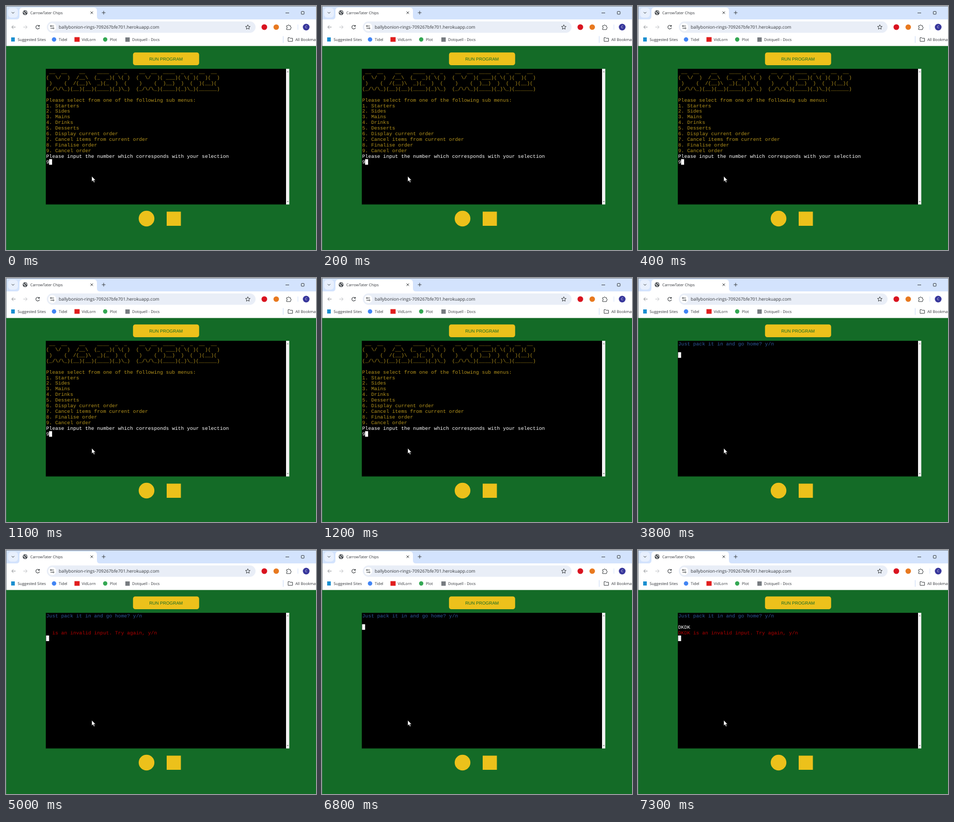
An HTML page for the animation above (8 s loop, 600 px wide and 474 px high).

```html
<!DOCTYPE html>
<html lang="en">
<head>
<meta charset="utf-8">
<title>Restaurant terminal</title>
<style>
  html, body { margin: 0; width: 100%; height: 100%; overflow: hidden; background: #146b27; }
  svg { display: block; width: 600px; height: 474px; }
  text { white-space: pre; text-rendering: geometricPrecision; }
  .ui { font-family: "Open Sans", sans-serif; font-size: 7.5px; fill: #33363b; }
  .term { font-family: "Liberation Mono", monospace; font-size: 9.67px; }
  .line { fill: none; stroke: #3c4043; stroke-width: 1; }
</style>
</head>
<body>
<svg viewBox="0 0 600 474">
  <!-- tab strip -->
  <rect width="600" height="40" fill="#d3e3fd"/>
  <rect x="4" y="3.5" width="19" height="19" rx="6" fill="#e8f0fe"/>
  <path class="line" d="M11 11.8l2.5 2.5 2.5-2.5" stroke-width="1.2"/>
  <path d="M20 26q6 0 6-6V9q0-6 6-6h138q6 0 6 6v11q0 6 6 6z" fill="#fff"/>
  <circle cx="37" cy="13" r="4.7" fill="#4a4e53"/>
  <path d="M33.4 11.6q2.2.2 2.6 1.7.2 1.2 1.2 1.4-.2 1.6-.6 2.2M38 9.2q-.8 1.6.6 2 1.7 0 2.2 1.6" fill="none" stroke="#fff" stroke-width="1.1"/>
  <text class="ui" x="47" y="15.8" style="font-size:7.35px">CarrowTater Chips</text>
  <path class="line" d="M163.6 10.6l4.8 4.8m0-4.8l-4.8 4.8M185.5 13h7m-3.5-3.5v7M541 13.5h7"/>
  <rect class="line" x="571.5" y="10.5" width="5.5" height="5.5" rx=".8"/>

  <!-- toolbar -->
  <rect y="26" width="600" height="52" fill="#fff"/>
  <g class="line">
    <path d="M18.5 41h-7.5m3.4-3.4l-3.4 3.4 3.4 3.4" stroke="#8b8e92"/>
    <path d="M33.5 41h7.5m-3.4-3.4l3.4 3.4-3.4 3.4" stroke="#bfc1c4"/>
    <path d="M64 38.8a3.5 3.5 0 1 0 .7 3.2M64.6 37v2.5h-2.5" stroke-width="1.1"/>
  </g>
  <rect x="79" y="30" width="404" height="22" rx="11" fill="#e9eef7"/>
  <circle cx="89.5" cy="41" r="7.8" fill="#fff"/>
  <g class="line" stroke-width=".9">
    <path d="M88.8 38.9h4M86 43.2h4"/>
    <circle cx="87" cy="38.9" r="1.2"/>
    <circle cx="91.7" cy="43.2" r="1.2"/>
  </g>
  <text class="ui" x="102" y="44.2" style="font-size:8.58px">ballybonion-rings-709267bfe701.herokuapp.com</text>
  <path class="line" d="M468 36.5l1.3 3 3.2.3-2.4 2.1.7 3.2-2.8-1.7-2.8 1.7.7-3.2-2.4-2.1 3.2-.3z" stroke-width=".9"/>
  <circle cx="500" cy="41" r="5.5" fill="#d9131f"/>
  <circle cx="523" cy="41" r="5.3" fill="#e8791f"/>
  <path class="line" d="M543 38.2h2.5a1.4 1.4 0 0 1 2.8 0h2.4v2.6a1.4 1.4 0 0 1 0 2.8v2.2h-7.7v-2.4a1.4 1.4 0 0 0 0-2.8z" stroke-width="1.1"/>
  <path d="M565 36v10" stroke="#d3e3fd"/>
  <circle cx="581" cy="41" r="6.5" fill="#37369b"/>
  <text class="ui" x="581" y="43.3" text-anchor="middle" style="font-size:6.5px;fill:#fff">C</text>

  <!-- bookmarks -->
  <rect x="10" y="61" width="7" height="8" fill="#1b8fd0"/>
  <circle cx="93" cy="65" r="4.3" fill="#4285f4"/>
  <rect x="132.5" y="60.5" width="10" height="9" fill="#e11d1d"/>
  <circle cx="192" cy="65" r="4.2" fill="#34a853"/>
  <rect x="231" y="61" width="8.5" height="8.5" fill="#777b80"/>
  <g class="ui">
    <text x="22.5" y="67.5">Suggested Sites</text>
    <text x="102" y="67.5">Tidel</text>
    <text x="146.5" y="67.5">VidLorn</text>
    <text x="201" y="67.5">Plot</text>
    <text x="244" y="67.5">Dotquell - Docs</text>
    <text x="560" y="67.5">All Bookmarks</text>
  </g>
  <path d="M536.5 58.5v13" stroke="#c9d9f5"/>
  <path class="line" d="M546 61.5h3l1 1.2h4.6v6h-8.6z"/>

  <!-- window edge -->
  <path d="M0 .5H600M.5 0V78" stroke="#7d848c" stroke-width="1"/>

  <!-- page -->
  <rect y="77.7" width="600" height="396.3" fill="#146b27"/>
  <rect y="78" width=".8" height="396" fill="#6c757d" opacity=".6"/>
  <rect x="245.8" y="90.2" width="128" height="24.9" rx="4.5" fill="#ecc11b"/>
  <text x="309.7" y="105.6" text-anchor="middle" font-family="Liberation Sans, Arial, sans-serif" font-size="8.55" fill="#146b27">RUN PROGRAM</text>
  <rect x="77" y="122" width="465" height="263.5" fill="#000"/>
  <rect x="542" y="122" width="6.3" height="263.5" fill="#f3f3f3"/>
  <path d="M543.3 128.6l2-2.2 2 2.2zM543.3 379l2 2.2 2-2.2z" fill="#8b8b8b"/>
  <circle cx="272" cy="413" r="15.2" fill="#ecc11b"/>
  <rect x="311" y="399.5" width="27.5" height="27.5" fill="#ecc11b"/>

  <g id="screen" class="term"></g>
  <rect id="caret" width="5.8" height="10.9" fill="#fff"/>
  <path d="M166 330.8v10.4l2.4-2.2 1.7 3.9 1.7-.8-1.7-3.7h3.2z" fill="#fff" stroke="#000" stroke-width=".5"/>
</svg>
<script>
const LOOP = 8000, LEFT = 77.8, TOP = 122.3, PITCH = 10.95, CHAR = 5.8;
const GOLD = '#b3921c', BLUE = '#2d5899', RED = '#ad0000', WHITE = '#fff';
const screenEl = document.getElementById('screen');
const caret = document.getElementById('caret');

const banner = String.raw`
 __  __    __    ____  _  _    __  __  ____  _  _  __  __
(  \/  )  /__\  (_  _)( \( )  (  \/  )( ___)( \( )(  )(  )
 )    (  /(__)\  _)(_  )  (    )    (  )__)  )  (  )(__)(
(_/\/\_)(__)(__)(____)(_)\_)  (_/\/\_)(____)(_)\_)(______)`.split('\n').slice(1);

const options = ['Starters', 'Sides', 'Mains', 'Drinks', 'Desserts', 'Display current order',
  'Cancel items from current order', 'Finalise order', 'Cancel order'];

// A line is [row, colour, text]; a view holds lines and the caret cell.
function menu() {
  const gold = [...banner, '', 'Please select from one of the following sub menus:',
    ...options.map((name, i) => `${i + 1}. ${name}`)];
  return {
    lines: [...gold.map((text, row) => [row, GOLD, text]),
      [15, WHITE, 'Please input the number which corresponds with your selection'],
      [16, WHITE, '9']],
    row: 16, col: 1
  };
}

function prompt(input, rejected) {
  const lines = [[0, BLUE, 'Just pack it in and go home? y/n'], [2, WHITE, input]];
  if (rejected) lines.push([3, RED, input + ' is an invalid input. Try again, y/n']);
  return { lines, row: rejected ? 4 : 2, col: rejected ? 0 : input.length };
}

const timeline = [
  [0, menu()],
  [2000, prompt('', false)],
  [2100, prompt('', true)],
  [3800, prompt('', false)],
  [4300, prompt(' ', false)],
  [4400, prompt(' ', true)],
  [6800, prompt('', false)],
  [6900, prompt('D', false)],
  [7000, prompt('DK', false)],
  [7200, prompt('DKDK', false)],
  [7300, prompt('DKDK', true)]
];

function textLine([row, colour, text]) {
  const el = document.createElementNS('http://www.w3.org/2000/svg', 'text');
  el.setAttribute('x', LEFT);
  el.setAttribute('y', TOP + 8.5 + row * PITCH);
  el.setAttribute('fill', colour);
  el.textContent = text;
  return el;
}

let shown;
function draw(time) {
  const view = timeline.filter(([start]) => start <= time).pop()[1];
  if (view === shown) return;
  shown = view;
  screenEl.replaceChildren(...view.lines.map(textLine));
  caret.setAttribute('x', LEFT - .2 + view.col * CHAR);
  caret.setAttribute('y', TOP + view.row * PITCH);
}

const begin = performance.now();
function tick() {
  draw((performance.now() - begin) % LOOP);
  requestAnimationFrame(tick);
}
tick();
</script>
</body>
</html>
```
